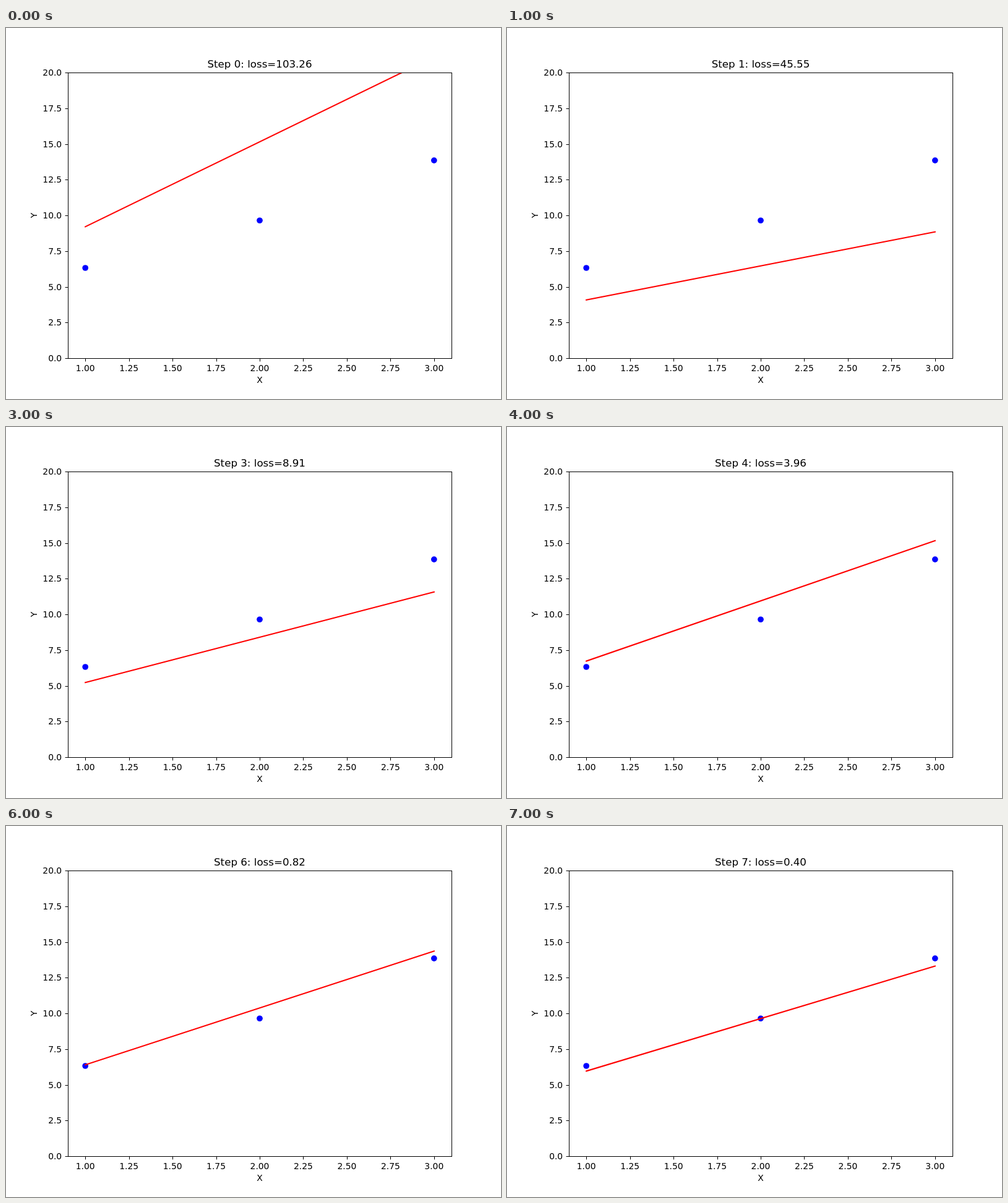
Recreate the animation shown at these times as an HTML page with a canvas. Size 800 px wide and 600 px high, loop 8000 ms.

```html
<!DOCTYPE html>
<html lang="en">
<head>
<meta charset="utf-8">
<title>Gradient descent line fit</title>
<style>
  html, body { margin: 0; width: 100%; height: 100%; overflow: hidden; background: #fff; }
  canvas { display: block; }
</style>
</head>
<body>
<canvas id="plot" width="800" height="600"></canvas>
<script>
const ctx = document.getElementById('plot').getContext('2d');
const LEFT = 100, TOP = 72, WIDTH = 620, HEIGHT = 462, BOTTOM = TOP + HEIGHT;
const STEP_MS = 1000, STEPS = 8, RATE = 0.1;
const points = [[1, 6.32], [2, 9.643], [3, 13.85]];

const px = x => LEFT + (x - 0.9) / 2.2 * WIDTH;
const py = y => BOTTOM - y / 20 * HEIGHT;
const snap = v => Math.round(v) + 0.5;

// Each step reports the loss before its update and the line after it.
function descend() {
  let slope = 0.58172, offset = 0.89775;
  return Array.from({ length: STEPS }, () => {
    let loss = 0, slopeGrad = 0, offsetGrad = 0;
    for (const [x, y] of points) {
      const error = slope * x + offset - y;
      loss += error * error / 2;
      slopeGrad += error * x;
      offsetGrad += error;
    }
    slope -= RATE * slopeGrad;
    offset -= RATE * offsetGrad;
    return { loss, slope, offset };
  });
}
const steps = descend();

function text(str, x, y, align = 'center', size = 13.889) {
  ctx.font = `${size}px "DejaVu Sans", sans-serif`;
  ctx.textAlign = align;
  ctx.fillStyle = '#000';
  ctx.fillText(str, x, y);
}

function segment(x1, y1, x2, y2) {
  ctx.beginPath();
  ctx.moveTo(x1, y1);
  ctx.lineTo(x2, y2);
  ctx.stroke();
}

function drawPoints() {
  ctx.fillStyle = '#00f';
  for (const [x, y] of points) {
    ctx.beginPath();
    ctx.arc(px(x), py(y), 4.86, 0, 2 * Math.PI);
    ctx.fill();
  }
}

function drawFit({ slope, offset }) {
  ctx.save();
  ctx.beginPath();
  ctx.rect(LEFT, TOP, WIDTH, HEIGHT);
  ctx.clip();
  ctx.strokeStyle = '#f00';
  ctx.lineWidth = 2.083;
  ctx.lineCap = 'square';
  segment(px(1), py(slope + offset), px(3), py(3 * slope + offset));
  ctx.restore();
}

function drawAxes() {
  ctx.strokeStyle = '#000';
  ctx.lineWidth = 1;
  for (let i = 0; i <= 8; i++) {
    const xValue = 1 + i / 4, yValue = i * 2.5;
    const x = px(xValue), y = py(yValue);
    segment(snap(x), BOTTOM + 0.5, snap(x), BOTTOM + 5.4);
    segment(LEFT + 0.5, snap(y), LEFT - 4.4, snap(y));
    text(xValue.toFixed(2), x, 555);
    text(yValue.toFixed(1), 90.2, Math.round(y + 5.2), 'right');
  }
  ctx.strokeRect(LEFT + 0.5, TOP + 0.5, WIDTH, HEIGHT);
  text('X', 410, 574);
  ctx.save();
  ctx.translate(50, 303);
  ctx.rotate(-Math.PI / 2);
  text('Y', 0, 0);
  ctx.restore();
}

function frame() {
  const index = Math.floor(performance.now() / STEP_MS) % STEPS;
  const step = steps[index];
  ctx.fillStyle = '#fff';
  ctx.fillRect(0, 0, 800, 600);
  drawPoints();
  drawFit(step);
  drawAxes();
  text(`Step ${index}: loss=${step.loss.toFixed(2)}`, 410, 64, 'center', 16.667);
  requestAnimationFrame(frame);
}
frame();
</script>
</body>
</html>
```
